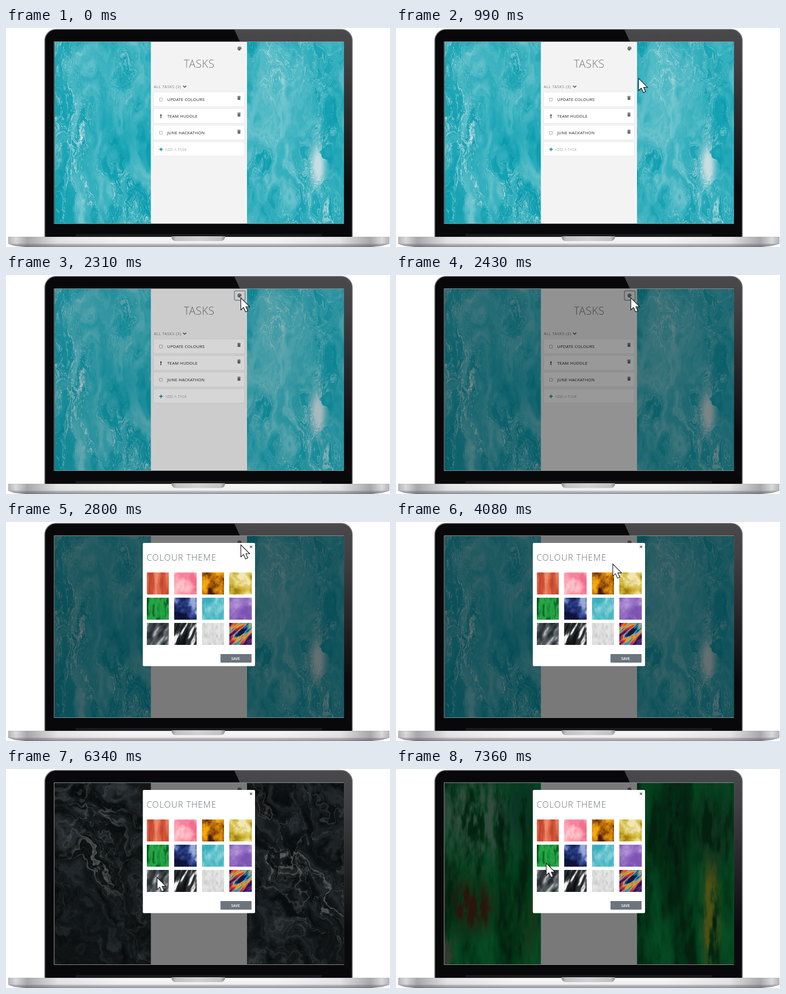
Write an HTML page with a canvas that moves like this. It is 717x408 px and loops after 8000 ms.

```html
<!DOCTYPE html>
<html lang="en">
<head>
<meta charset="utf-8">
<title>Task list colour themes</title>
<style>
html, body { margin: 0; width: 100%; height: 100%; overflow: hidden; background: #fff; }
canvas { display: block; }
</style>
</head>
<body>
<canvas id="stage" width="717" height="408"></canvas>
<script>
const W = 717, H = 408, LOOP = 8000, STEP = 70;
const SCREEN = { x: 91, y: 26, w: 540, h: 338 };
const FONT = '"Open Sans", "Noto Sans", sans-serif';
const ctx = document.getElementById('stage').getContext('2d');

const clamp = (v, lo = 0, hi = 1) => Math.min(hi, Math.max(lo, v));
const mix = (a, b, k) => a + (b - a) * k;
const easeOut = p => 1 - (1 - p) ** 1.4;
const easeInOut = p => p * p * (3 - 2 * p);
const rgb = hex => [1, 3, 5].map(i => parseInt(hex.slice(i, i + 2), 16));
const palette = text => text.split(' ').map(rgb);
const blend = (a, b, k) => a.map((v, i) => mix(v, b[i], k));

function layer(w, h, draw) {
  const c = document.createElement('canvas');
  c.width = w;
  c.height = h;
  draw(c.getContext('2d'));
  return c;
}

// ---- textures ----
function hash(x, y) {
  let h = Math.imul(x, 374761393) + Math.imul(y, 668265263);
  h = Math.imul(h ^ (h >>> 13), 1274126177);
  return ((h ^ (h >>> 16)) >>> 0) / 4294967296;
}

function noise(x, y) {
  const i = Math.floor(x), j = Math.floor(y);
  const u = easeInOut(x - i), v = easeInOut(y - j);
  return mix(mix(hash(i, j), hash(i + 1, j), u), mix(hash(i, j + 1), hash(i + 1, j + 1), u), v);
}

// Each octave is turned a little, which hides the noise grid.
function fbm(x, y, octaves = 4) {
  let sum = 0, amp = 0.5, total = 0;
  for (let i = 0; i < octaves; i++) {
    sum += amp * noise(x, y);
    total += amp;
    amp *= 0.5;
    const turned = 1.8 * x + 0.9 * y + 17;
    y = 1.8 * y - 0.9 * x + 31;
    x = turned;
  }
  return sum / total;
}

const ridge = (v, width, level = 0.5) => Math.max(0, 1 - Math.abs(v - level) / width);
const spot = (x, y, cx, cy, rx, ry) => Math.exp(-(((x - cx) / rx) ** 2) - ((y - cy) / ry) ** 2);

function ramp(colors, v) {
  const p = clamp(v) * (colors.length - 1);
  const i = Math.min(colors.length - 2, Math.floor(p));
  return blend(colors[i], colors[i + 1], p - i);
}

function paint(w, h, shade) {
  return layer(w, h, c => {
    const img = c.createImageData(w, h);
    for (let y = 0, n = 0; y < h; y++) {
      for (let x = 0; x < w; x++, n += 4) {
        const color = shade(x, y);
        for (let k = 0; k < 3; k++) img.data[n + k] = color[k];
        img.data[n + 3] = 255;
      }
    }
    c.putImageData(img, 0, 0);
  });
}

// Wallpapers are shaded in stage coordinates; the middle stays hidden by the app panel.
function wallpaper(shade) {
  const hidden = [243, 243, 243];
  return paint(SCREEN.w, SCREEN.h, (x, y) =>
    x > 181 && x < 358 ? hidden : shade(x + SCREEN.x, y + SCREEN.y));
}

const TEAL = palette('#0a9cae #22a8b8 #43b5c2 #6fc5ce');
const FOAM = rgb('#d9e4e6');
function teal(x, y) {
  const a = fbm(x / 38, y / 80), b = fbm(x / 38 + 9, y / 80 + 4);
  const u = x / 38 + 3.4 * a, v = y / 110 + 3 * b;
  const f = fbm(u, v, 5), g = fbm(u * 1.7 + 7, v * 1.7, 5);
  const calm = clamp(spot(x, y, 225, 205, 26, 55) + spot(x, y, 222, 100, 22, 40) * 0.6);
  const busy = spot(x, y, 115, 60, 45, 50) + spot(x, y, 580, 260, 22, 60)
    + spot(x, y, 150, 320, 90, 50) * 0.5 + spot(x, y, 620, 70, 25, 60) * 0.6;
  const base = ramp(TEAL, (f - 0.24) / 0.54 + busy * 0.18 - calm * 0.45);
  const drift = clamp((fbm(x / 45 + 30, y / 90, 2) - 0.3) * 2.2);
  const vein = ridge(g, 0.03) * 0.7 + ridge(g, 0.02, 0.6) * 0.5 + ridge(f, 0.018, 0.42) * 0.5;
  const patch = spot(x, y, 582, 255, 15, 45) * clamp((g - 0.4) * 6);
  return blend(base, FOAM, clamp((vein * (drift + busy * 0.6) + patch) * (1 - calm), 0, 0.9));
}

const STONE = palette('#12191c #252f32 #465358');
const QUARTZ = rgb('#c2caca');
function stone(x, y) {
  const a = fbm(x / 50, y / 50), b = fbm(x / 50 + 5, y / 50 + 8);
  const u = (0.8 * x - 0.6 * y) / 55 + 1.9 * a, v = (0.6 * x + 0.8 * y) / 105 + 1.9 * b;
  const f = fbm(u + 3, v, 5), g = fbm(u * 2, v * 2 + 6, 5);
  const busy = spot(x, y, 170, 150, 40, 100) + spot(x, y, 525, 150, 85, 75) + spot(x, y, 600, 250, 40, 70);
  const base = ramp(STONE, fbm(u * 3.5, v * 2.5, 5) * 2 - 0.55);
  const vein = ridge(f, 0.035) * (0.25 + busy * 0.7) + ridge(g, 0.025) * (0.1 + busy * 0.5);
  return blend(base, QUARTZ, clamp(vein, 0, 0.85));
}

const LEAF = palette('#06421d #057a36 #0c9846');
const DABS = [
  [145, 90, 60, 75, '#6d9c84'], [132, 255, 42, 42, '#5c2012'], [235, 70, 24, 60, '#17644c'],
  [520, 125, 24, 105, '#0d2b1c'], [588, 265, 13, 100, '#aca325'], [595, 110, 30, 60, '#2d6048'],
  [245, 290, 18, 45, '#2f6a30'], [95, 345, 10, 30, '#74745e']
].map(([cx, cy, rx, ry, c]) => [cx, cy, rx, ry, rgb(c)]);
function leaf(x, y) {
  const n = fbm(x / 22, y / 110);
  const grain = fbm(x / 7 + 40, y / 24, 3);
  let color = ramp(LEAF, 0.5 + (n - 0.5) * 2 + (grain - 0.5) * 0.5);
  for (const [cx, cy, rx, ry, c] of DABS) {
    const near = spot(x, y, cx, cy, rx, ry);
    if (near > 0.05) color = blend(color, c, clamp(near * (0.75 + (n + grain - 1) * 3), 0, 0.9));
  }
  return color;
}

const wallpapers = { teal: wallpaper(teal), stone: wallpaper(stone), leaf: wallpaper(leaf) };

// Swatches: colours, noise size across and along the stroke, slant in radians
const swatches = [
  ['#c2452e #dd6546 #ee8a6c', 6, 40, 0],
  ['#f0708c #ff98ac #fac6ca', 16, 20, 0.3],
  ['#421a0a #b06408 #f2a20a #f8b418', 14, 18, 0.4],
  ['#a07c16 #c8a92a #d8c250 #f2e6b4', 18, 14, 0.9],
  ['#08481c #109038 #2cac4a #0c6428', 7, 26, 0],
  ['#0c1238 #1c2a68 #3a4f98 #98a8d8', 18, 20, 0],
  ['#36aebc #58bec9 #8fd4da', 7, 18, 0],
  ['#7d54b2 #9873c6 #bda2dc', 20, 22, 0.6],
  ['#262c30 #444c50 #5c6468 #b4b8ba', 8, 20, 0.6],
  ['#0c0e10 #1e2224 #34383a #f0f0f0', 7, 30, 0.4],
  ['#cacaca #dcdcdc #e6e6e6', 4, 8, 0],
  ['#171b58 #6a2c84 #e03a2c #f2a024 #2496d0 #14183c', 9, 34, 0.8]
].map(([colors, across, along, slant], i) => {
  const stops = palette(colors), cos = Math.cos(slant), sin = Math.sin(slant);
  return paint(42, 41, (x, y) => {
    const n = fbm((x * cos + y * sin) / across + i * 23, (y * cos - x * sin) / along + i * 11 + 50);
    return ramp(stops, 0.5 + (n - 0.5) * 2.3);
  });
});

// ---- drawing helpers ----
function box(c, x, y, w, h, r, fill, line, width = 1) {
  c.beginPath();
  c.roundRect(x, y, w, h, r);
  if (fill) { c.fillStyle = fill; c.fill(); }
  if (line) { c.strokeStyle = line; c.lineWidth = width; c.stroke(); }
}

function path(c, points) {
  c.beginPath();
  points.forEach(([x, y]) => c.lineTo(x, y));
}

function disc(c, x, y, r, fill) {
  c.fillStyle = fill;
  c.beginPath();
  c.arc(x, y, r, 0, 7);
  c.fill();
}

function label(c, text, x, y, size, color, spacing, weight = 300) {
  c.font = `${weight} ${size}px ${FONT}`;
  c.letterSpacing = spacing + 'px';
  c.fillStyle = color;
  c.fillText(text, x, y);
}

function fade(c, x0, y0, x1, y1, stops) {
  const g = c.createLinearGradient(x0, y0, x1, y1);
  stops.forEach(([at, color]) => g.addColorStop(at, color));
  return g;
}

// ---- static layers ----
const laptop = layer(W, H, c => {
  c.fillStyle = '#fff';
  c.fillRect(0, 0, W, H);
  const lid = [72.5, 2.5, 574, 388, [21, 21, 3, 3]];
  box(c, ...lid, '#08080a');
  c.save();
  c.clip();
  path(c, [[425, 0], [648, 0], [648, 380], [631, 365], [631, 26], [437, 26]]);
  c.fillStyle = fade(c, 0, 0, 0, 300, [[0, '#4a4a4c'], [0.2, '#414143'], [1, '#0a0a0c']]);
  c.fill();
  c.restore();
  box(c, ...lid, null, '#6f7073', 1.6);
  box(c, 90, 25.5, 540.5, 339, 0, null, '#8b8d8f', 1.2);
  c.fillStyle = '#1c1c1e';
  c.fillRect(130, 384, 460, 4);

  path(c, [[4, 389], [716, 389], [716, 402], [702, 406], [682, 408], [36, 408], [16, 406], [4, 402]]);
  c.fillStyle = fade(c, 4, 0, 716, 0, [[0, '#b5b5b8'], [0.02, '#dcdcdf'], [0.05, '#a9a9ad'],
    [0.13, '#e6e6e8'], [0.3, '#f6f6f6'], [0.7, '#f6f6f6'], [0.87, '#e6e6e8'], [0.95, '#a9a9ad'],
    [0.98, '#dcdcdf'], [1, '#b5b5b8']]);
  c.fill();
  c.fillStyle = fade(c, 0, 389, 0, 408, [[0, 'rgba(90,90,95,.2)'], [0.1, 'rgba(120,120,125,0)'],
    [0.62, 'rgba(120,120,125,.06)'], [0.75, 'rgba(95,95,100,.4)'], [1, 'rgba(80,80,85,.6)']]);
  c.fill();
  box(c, 309, 388, 100, 9, [0, 0, 8, 8], fade(c, 309, 0, 409, 0,
    [[0, '#8c8c90'], [0.08, '#c2c2c5'], [0.5, '#d2d2d4'], [0.92, '#c2c2c5'], [1, '#8c8c90']]));
});

function trash(c, x, y) {
  c.fillStyle = '#6a6a6a';
  c.fillRect(x - 3.2, y, 6.4, 1.1);
  c.fillRect(x - 1.1, y - 0.6, 2.2, 1);
  box(c, x - 2.6, y + 1.6, 5.2, 5.4, [0, 0, 1, 1], '#6a6a6a');
}

const app = layer(W, H, c => {
  c.fillStyle = '#f3f3f3';
  c.fillRect(270.5, 26, 179.5, 338);
  disc(c, 436, 38.2, 3.7, '#666');
  [[434, 38.5], [435.2, 36.4], [437.4, 36.6]].forEach(([x, y]) => disc(c, x, y, 0.6, '#f3f3f3'));
  disc(c, 438.8, 40.5, 1.3, '#f3f3f3');
  label(c, 'TASKS', 332, 73.5, 20, '#777', 0.6);
  label(c, 'ALL TASKS (3)', 276, 112, 7, '#777', 0.6, 400);
  path(c, [[330.6, 107.6], [333.6, 110.4], [336.6, 107.6]]);
  c.strokeStyle = '#5c5c5c';
  c.lineWidth = 1.6;
  c.stroke();

  ['UPDATE COLOURS', 'TEAM HUDDLE', 'JUNE HACKATHON', ''].forEach((task, i) => {
    const y = 133 + i * 31;
    box(c, 275.5, y - 14, 170, i < 3 ? 27.5 : 26.5, 1.5, '#fff', '#e8e8e8');
    if (!task) return;
    label(c, task, 301, y + 3, 7.8, '#222', 0.25, 400);
    trash(c, 435, y - 6 + (i === 2 ? 1 : 0));
    if (i === 1) {
      box(c, 288.3, y - 3.3, 2, 4.6, 0.8, '#333');
      disc(c, 289.3, y + 3, 1.1, '#333');
    } else {
      box(c, 286.5, y - 2.5, 5.5, 5.5, 0.5, null, '#b0b0b0');
    }
  });
  c.fillStyle = '#1c90a6';
  c.fillRect(286.3, 225.2, 6.4, 1.8);
  c.fillRect(288.6, 222.9, 1.8, 6.4);
  label(c, 'ADD A TASK', 297, 228.5, 7, '#707070', 0.35);
});

const dialog = layer(W, H, c => {
  box(c, 255.5, 39, 209.5, 229.5, 2, '#fff');
  label(c, 'COLOUR THEME', 262.5, 71.5, 16, '#686c70', 1);
  c.strokeStyle = '#555';
  c.lineWidth = 1.3;
  for (const s of [-1, 1]) {
    path(c, [[455.4, 46.3 - 2.1 * s], [459.6, 46.3 + 2.1 * s]]);
    c.stroke();
  }
  swatches.forEach((s, i) => c.drawImage(s, 262.5 + (i % 4) * 51.5, 94 + Math.floor(i / 4) * 47, 41.5, 40.5));
  box(c, 400.5, 246, 58, 16, 1, '#6c757d');
  label(c, 'SAVE', 420.5, 256.6, 6.8, '#fff', 0, 600);
});

// ---- motion ----
const stepsSince = (t, start) => Math.floor((t - start) / STEP);

function pointer(t) {
  if (t < 500) return null;
  if (t < 1280) {
    const u = easeOut(clamp(stepsSince(t, 500) / 9)), v = 1 - u;
    return [467 * v * v + 1000 * u * v + 439 * u * u, mix(371, 55, u)];
  }
  if (t < 1550) return [438, 49];
  if (t < 1620) return [438, 45];
  if (t < 3930) return [438, 42];
  if (t < 6340) {
    const p = easeInOut(clamp((stepsSince(t, 3930) + 1) / 10));
    return [mix(438, 282, p), mix(42, 208, p)];
  }
  const p = easeOut(clamp((stepsSince(t, 6340) + 1) / 7));
  return [mix(282, 280, p), mix(208, 175, p)];
}

const clicking = t => [2170, 5020, 7230].some(at => t >= at && t < at + 130);

function drawPointer(x, y, pressed) {
  if (pressed) disc(ctx, x, y + 1, 19, 'rgba(236,226,40,.66)');
  ctx.save();
  ctx.translate(x + 0.5, y + 0.5);
  path(ctx, [[0, 0], [0, 22.5], [5, 18], [8.8, 26.3], [13, 24.5], [9.4, 16.5], [16.5, 16.5]]);
  ctx.closePath();
  ctx.fillStyle = '#fff';
  ctx.fill();
  ctx.strokeStyle = '#111';
  ctx.lineWidth = 1.1;
  ctx.stroke();
  if (pressed) {
    ctx.clip();
    disc(ctx, -0.5, 0.5, 19, 'rgba(255,245,60,.5)');
  }
  ctx.restore();
}

function draw(t) {
  ctx.drawImage(laptop, 0, 0);
  ctx.save();
  ctx.beginPath();
  ctx.rect(SCREEN.x, SCREEN.y, SCREEN.w, SCREEN.h);
  ctx.clip();
  const theme = t < 5150 ? 'teal' : t < 7360 ? 'stone' : 'leaf';
  ctx.drawImage(wallpapers[theme], SCREEN.x, SCREEN.y);
  ctx.drawImage(app, 0, 0);
  if (t >= 2170 && t < 2520) box(ctx, 426.5, 29.5, 20, 17.5, 2, null, '#8799a2', 1.5);
  if (t >= 2310) {
    const k = stepsSince(t, 2310);
    ctx.fillStyle = `rgba(0,0,0,${Math.min(0.5, 0.16 + 0.24 * k)})`;
    ctx.fillRect(SCREEN.x, SCREEN.y, SCREEN.w, SCREEN.h);
    const shown = easeOut(clamp((k - 1) / 6));
    ctx.globalAlpha = shown;
    ctx.drawImage(dialog, 0, -14 * (1 - shown));
  }
  ctx.restore();
  const tip = pointer(t);
  if (tip) drawPointer(...tip, clicking(t));
}

const begin = performance.now();
function tick() {
  draw((performance.now() - begin) % LOOP);
  requestAnimationFrame(tick);
}
tick();
</script>
</body>
</html>
```
